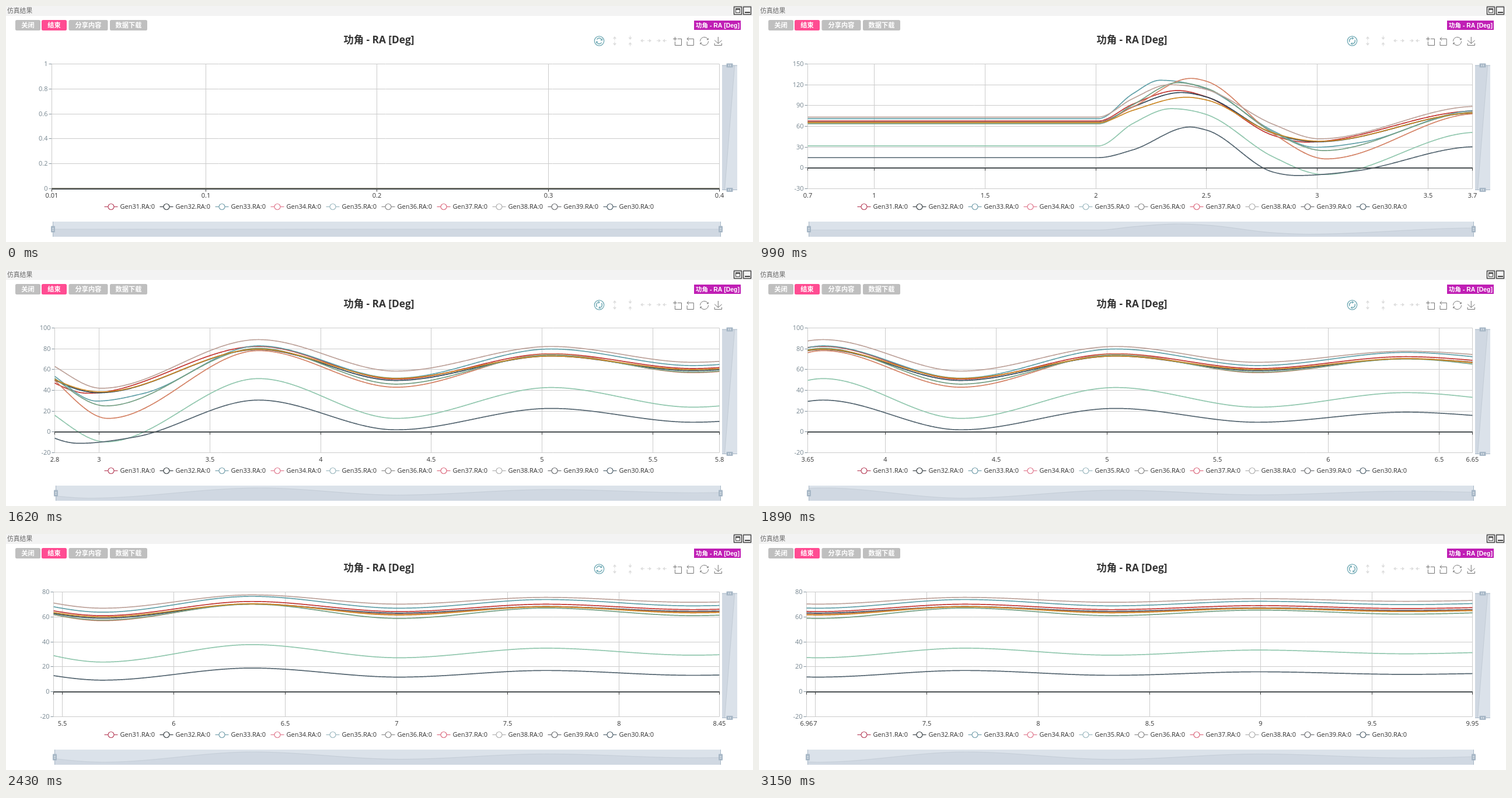
Recreate the animation shown at these times as an HTML page with a canvas. Size 1280 by 405 pixels, loop 3180 ms.

```html
<!DOCTYPE html>
<html lang="zh">
<head>
<meta charset="utf-8">
<style>
html, body { margin: 0; width: 100%; height: 100%; overflow: hidden; background: #fff; }
canvas { display: block; }
</style>
</head>
<body>
<canvas id="stage" width="1280" height="405"></canvas>
<script>
const c = document.getElementById('stage').getContext('2d');
const SANS = '"Open Sans", "Noto Sans CJK SC", "Noto Sans CJK", sans-serif';
const ARIAL = '"Liberation Sans", "Noto Sans CJK SC", "Noto Sans CJK", sans-serif';
const TOP = 99.5, BOTTOM = 313.5, RIGHT = 1222.5;

// colour, steady value, first peak, first trough, values on the first swing
// (rising, falling, falling), next five extremes, extra points
const series = [
  ['#c23531', 67.7, [2.37, 111.7], [2.95, 37.2], [92, 102.5, 47], [82.3, 50.8, 75.2, 61, 72.4]],
  ['#2f4554', 66.1, [2.385, 108.8], [3, 37.7], [88, 102.3, 50], [79.3, 49.5, 73, 59, 70.3]],
  ['#61a0a8', 71, [2.29, 126.5], [2.99, 29.7], [107, 114, 53.5], [82.8, 51.7, 79.8, 63.8, 76.5], [[3.2, 37]]],
  ['#d48265', 65.7, [2.43, 129.2], [3.04, 13], [88, 125, 49.5], [78.2, 43, 75, 57, 70.6]],
  ['#91c7ae', 31.7, [2.34, 85.5], [3.03, -9.6], [64, 77, 16], [51.3, 13, 42.7, 23.8, 37.8]],
  ['#749f83', 63.6, [2.37, 123], [3.03, 25], [91, 115, 51.5], [80.5, 46, 74, 57.5, 70.2]],
  ['#ca8622', 65.3, [2.41, 102], [3.01, 38.5], [83, 98, 50.5], [79.6, 51.5, 73, 60, 70.5]],
  ['#bda29a', 73.4, [2.33, 120], [3.01, 42], [100, 113, 63], [88.8, 58.5, 82.2, 67, 77.7]],
  ['#546570', 14.8, [2.425, 59], [2.91, -11], [26, 54.5, -6], [30.6, 2, 22.6, 9.3, 19], [[3.16, -5]]]
].map(([color, base, peak, trough, swing, ext, extra = []]) => {
  const at = (times, values) => values.map((v, i) => [times[i], v]);
  const pts = [[0, 0], [0.5, 0], [0.51, base], [2.01, base], peak, trough, ...extra,
    ...at([2.167, 2.5, 2.8], swing), ...at([3.72, 4.34, 5.04, 5.68, 6.35], ext)];
  for (let k = 1; k < 7; k++) pts.push([6.35 + 0.66 * k, base + (ext[4] - base) * (-0.73) ** k]);
  pts.sort((a, b) => a[0] - b[0]);
  return { color, at: smooth(pts) };
});

// Monotone cubic interpolation, flat at every extreme
function smooth(p) {
  const h = p.slice(1).map((q, i) => q[0] - p[i][0]);
  const sec = h.map((d, i) => (p[i + 1][1] - p[i][1]) / d);
  const m = p.map((_, i) => {
    const a = sec[i - 1] || 0, b = sec[i] || 0;
    if (a * b <= 0) return 0;
    const slope = (h[i] * a + h[i - 1] * b) / (h[i] + h[i - 1]);
    return Math.sign(a) * Math.min(Math.abs(slope), 3 * Math.abs(a), 3 * Math.abs(b));
  });
  return t => {
    let i = 0;
    while (i < p.length - 2 && t > p[i + 1][0]) i++;
    const u = (t - p[i][0]) / h[i], w = 1 - u;
    return w * w * ((1 + 2 * u) * p[i][1] + u * h[i] * m[i]) +
      u * u * ((3 - 2 * u) * p[i + 1][1] - w * h[i] * m[i + 1]);
  };
}

function niceStep(span) {
  const raw = span / 5, e = 10 ** Math.floor(Math.log10(raw)), f = raw / e;
  return e * (f < 1.5 ? 1 : f < 2.5 ? 2 : f < 4 ? 3 : f < 7 ? 5 : 10);
}

function rect(x, y, w, h, color, r = 0) {
  c.fillStyle = color;
  c.beginPath();
  c.roundRect(x, y, w, h, r);
  c.fill();
}

function line(pts, color, width = 1) {
  c.strokeStyle = color;
  c.lineWidth = width;
  c.beginPath();
  pts.forEach(p => c.lineTo(p[0], p[1]));
  c.stroke();
}

function text(s, x, y, color, align = 'center', font = '11px ' + SANS) {
  c.font = font;
  c.textAlign = align;
  c.fillStyle = color;
  c.fillText(s, x, y);
}

function arrow(x, y, turn) {
  c.save();
  c.translate(x, y);
  c.rotate(turn * Math.PI / 2);
  line([[-7, 0], [-2, 0]], '#ddd');
  c.fillStyle = '#ddd';
  c.beginPath();
  c.moveTo(0, 0);
  c.lineTo(-4, -3);
  c.lineTo(-4, 3);
  c.fill();
  c.restore();
}

function drawHeader() {
  rect(0, 0, 1280, 17, '#f3f3f3');
  text('仿真结果', 2, 11.5, '#666', 'left', '10.8px ' + SANS);
  c.strokeStyle = '#444';
  c.lineWidth = 1.5;
  c.strokeRect(1247.5, 1.5, 13, 13);
  c.strokeRect(1263.5, 1.5, 13, 13);
  c.lineWidth = 1;
  c.strokeRect(1250.5, 4.5, 7, 7);
  rect(1250, 4, 8, 2.5, '#444');
  rect(1266, 10, 9, 2, '#444');

  [['关闭', 16, 43], ['结束', 61, 43], ['分享内容', 107.5, 67], ['数据下载', 178, 64]].forEach(([s, x, w], i) => {
    rect(x, 24, w, 18, i === 1 ? '#ff4c92' : '#bfbfbf', 2.5);
    text(s, x + w / 2, 37, '#fff', 'center', 'bold 11.2px ' + ARIAL);
  });
  rect(1179, 25, 80, 16, '#c01fb5');
  text('功角 - RA [Deg]', 1219.5, 36.8, '#fff', 'center', 'bold 10.45px ' + ARIAL);
  text('功角 - RA [Deg]', 639, 63.5, '#333', 'center', 'bold 17.3px ' + SANS);
}

const icons = [
  [1143, 'M0,13.5h26.9M13.5,26.9V0M32.1,13.5H58V58H13.5V32.1'],
  [1164.5, 'M22,1.4L9.9,13.5l12.3,12.3M10.3,13.5H54.9v44.6H10.3v-26'],
  [1189, 'M47,18.9h9.8V8.7M56.3,20.1C52.1,9,40.5,.6,26.8,2.1C12.6,3.7,1.6,16.2,2.1,30.6M13,41.1H3.1v10.2M3.7,39.9c4.2,11.1,15.8,19.5,29.5,18c14.2-1.6,25.2-14.1,24.7-28.5'],
  [1213, 'M4.7,22.9L29.3,45.5L54.7,23.4M4.6,43.6V58H53.8V43.6M29.2,45.1V0']
].map(([x, d]) => [x, new Path2D(d)]);

function drawTools(angle) {
  c.save();
  c.translate(1016.5, 60);
  c.strokeStyle = c.fillStyle = '#6fa9b4';
  c.lineWidth = 1.3;
  c.beginPath();
  c.arc(0, 0, 8.2, 0, 7);
  c.stroke();
  c.rotate(angle);
  c.lineWidth = 1.5;
  for (let i = 0; i < 2; i++) {
    c.beginPath();
    c.arc(0, 0, 4.9, 3.7, 5.5);
    c.stroke();
    c.beginPath();
    c.moveTo(5.6, -4.4);
    c.lineTo(5.4, -0.2);
    c.lineTo(1.6, -1.6);
    c.fill();
    c.rotate(Math.PI);
  }
  c.restore();

  arrow(1043, 52, -1);
  arrow(1043, 68, 1);
  arrow(1069.5, 58, 1);
  arrow(1069.5, 62, -1);
  arrow(1087, 59.5, 2);
  arrow(1106, 59.5, 0);
  arrow(1122, 59.5, 0);
  arrow(1125, 59.5, 2);

  for (const [x, path] of icons) {
    c.save();
    c.translate(x, 53);
    c.scale(0.25, 0.25);
    c.strokeStyle = '#666';
    c.lineWidth = 3.6;
    c.stroke(path);
    c.restore();
  }
}

function drawLegend() {
  ['#b8455f', '#3c4448', '#76a0ad', '#e07a90', '#9db9c0', '#8c8c8c', '#dc6c80', '#b0b0b0', '#6e7074', '#546570']
    .forEach((color, i) => {
      const x = 180 + 95 * i;
      line([[x - 11.5, 344.5], [x + 11.5, 344.5]], color, 1.2);
      c.beginPath();
      c.arc(x, 344.5, 5, 0, 7);
      c.fillStyle = '#fff';
      c.fill();
      c.stroke();
      text(`Gen${i < 9 ? 31 + i : 30}.RA:0`, x + 15.5, 348, '#333', 'left');
    });
}

function handle(x, y, upright) {
  c.save();
  c.translate(x, y);
  if (!upright) c.rotate(Math.PI / 2);
  rect(-3.5, -5.5, 7, 11, '#a7b7c6', 1);
  line([[-1.5, -1.5], [1.5, -1.5]], '#eef2f6');
  line([[-1.5, 1.5], [1.5, 1.5]], '#eef2f6');
  c.restore();
}

function shadow(pts, close) {
  c.fillStyle = '#d0d8e2';
  c.beginPath();
  [...pts, ...close].forEach(p => c.lineTo(p[0], p[1]));
  c.fill();
  line(pts, '#c3ccd6');
}

function drawSliders(left, values) {
  rect(1227, 102, 26, 213, '#dbe2ea');
  shadow([[1248.5, 102], [1231.5, 315]], [[1227, 315], [1227, 102]]);
  for (const y of [102, 315.5]) {
    line([[1227, y], [1253, y]], '#a7b7c6');
    handle(1240, y, false);
  }
  const x0 = left + 2, x1 = 1224.5;
  const lo = Math.min(...values), span = Math.max(...values) - lo;
  rect(x0, 370, x1 - x0, 26, '#dbe2ea');
  shadow(values.map((v, i) => [
    x0 + (x1 - x0) * i / (values.length - 1),
    span ? 391.5 - 17.5 * (v - lo) / span : 383
  ]), [[x1, 396], [x0, 396]]);
  for (const x of [x0, x1]) {
    line([[x, 370], [x, 396]], '#a7b7c6');
    handle(x, 383, true);
  }
}

function drawChart(t0, t1) {
  const count = 1140;
  const data = series.map(s => Array.from({ length: count + 1 }, (_, i) => s.at(t0 + (t1 - t0) * i / count)));
  const max = Math.max(...data.flat());
  const min = Math.min(-2, ...data.flat());
  const step = max ? niceStep(max - min) : 0.2;
  const lo = max ? Math.floor(min / step) * step : 0;
  const hi = max ? Math.ceil(max / step) * step : 1;
  const left = max ? (hi < 100 ? 81.5 : 83.5) : 78.5;
  const X = t => left + (RIGHT - left) * (t - t0) / (t1 - t0);
  const Y = v => BOTTOM - (BOTTOM - TOP) * (v - lo) / (hi - lo);
  const crisp = v => Math.floor(v) + 0.5;

  for (let i = 0; i <= Math.round((hi - lo) / step); i++) {
    const v = lo + i * step, y = crisp(Y(v));
    line([[left, y], [RIGHT, y]], '#ccc');
    line([[left - 5, y], [left, y]], '#8796a0');
    text(+v.toFixed(1), left - 7, y + 3.5, '#75858f', 'right');
  }

  const gap = niceStep(t1 - t0), ticks = [t0];
  for (let k = Math.ceil((t0 + 0.001) / gap); k * gap < t1 - 0.001; k++) ticks.push(k * gap);
  ticks.push(t1);
  const labels = ticks.map(t => String(+t.toFixed(2)));
  const overlap = (a, b) => X(ticks[b]) - X(ticks[a]) <
    (c.measureText(labels[a]).width + c.measureText(labels[b]).width) / 2;
  const last = ticks.length - 1;
  const hidden = [overlap(0, 1) && 0, overlap(last - 1, last) && last];
  const zero = crisp(Y(0));
  ticks.forEach((t, i) => {
    const x = crisp(X(t));
    line([[x, TOP], [x, BOTTOM]], '#ccc');
    line([[x, zero], [x, zero + 5]], '#333');
    if (!hidden.includes(i)) text(labels[i], x, 328.5, '#333');
  });

  c.lineJoin = 'round';
  data.forEach((values, k) => line(
    values.map((v, i) => [left + (RIGHT - left) * i / count, Y(v)]), series[k].color, 1.7));
  line([[left, zero + 0.5], [RIGHT, zero + 0.5]], '#4a5052', 2);
  drawSliders(left, data[0]);
}

let shown = -1;
function tick(now) {
  const n = Math.floor(now % 3180 / 30);
  if (n !== shown) {
    shown = n;
    c.clearRect(0, 0, 1280, 405);
    // The stream lags slightly in the middle and stops at 9.95 s
    const lag = n > 60 && n < 82 ? 0.05 : 0;
    const end = Math.min(9.95, 0.4 + 0.1 * n - lag);
    drawHeader();
    drawTools(n * 42 * Math.PI / 180);
    drawChart(Math.max(0.01, end - (end > 8 ? 2.99 : 3)), end);
    drawLegend();
  }
  requestAnimationFrame(tick);
}
tick(0);
</script>
</body>
</html>
```
